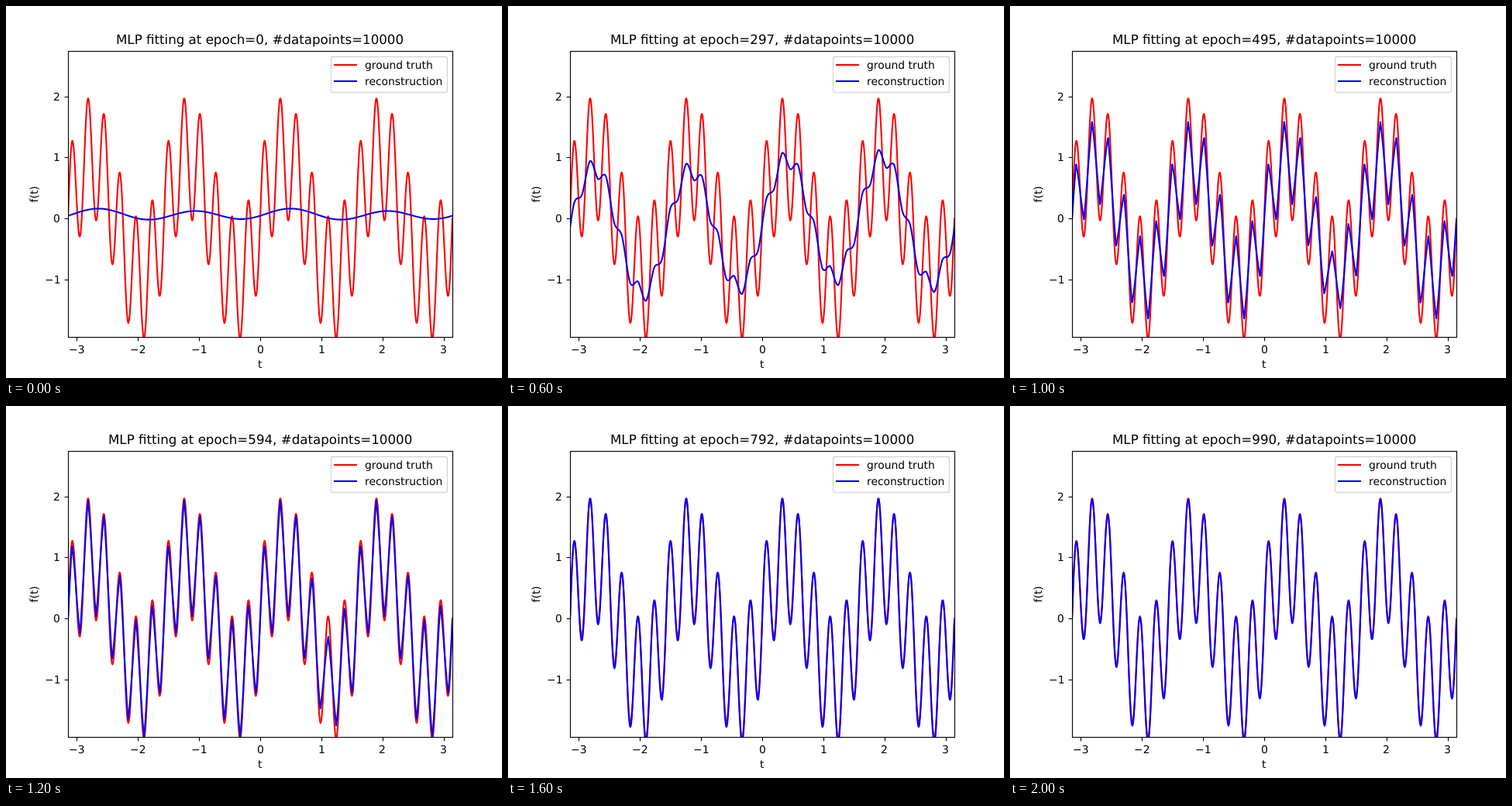
Recreate the animation shown at these times as an HTML page with a canvas. Size 640 by 480 pixels, loop 2200 ms.

```html
<!DOCTYPE html>
<html lang="en">
<head>
<meta charset="utf-8">
<title>MLP fitting</title>
<style>
  html, body { margin: 0; width: 100%; height: 100%; overflow: hidden; background: #fff; }
  canvas { display: block; }
</style>
</head>
<body>
<canvas id="plot" width="640" height="480"></canvas>
<script>
const ctx = document.getElementById('plot').getContext('2d');
const FONT = '"DejaVu Sans", sans-serif';
const BOX = { left: 80, right: 576, top: 57.6, bottom: 427.2 };
const WIDTH = BOX.right - BOX.left;
const UNIT = 78.75, ZERO = 274.05;
const STEP_MS = 200, STEPS = 11, EPOCHS = 99;
const LINE = 2.08, THIN = 1.11;

const xOf = t => BOX.left + (t + Math.PI) / (2 * Math.PI) * WIDTH;
const yOf = v => ZERO - v * UNIT;
const mix = (a, b, u) => a + (b - a) * u;

const truth = t => Math.sin(4 * t) + Math.sin(24 * t);

// How much of each wave the network has learned; steps between are blended.
// low, high: swing of the slow and fast wave; corner: how angular the fast one is;
// drift, swell: slow tilts; dip: weak spot where the fast wave is learned late.
const REST = { low: 1, high: 0, lag: 0, bias: 0, drift: 0, swell: 0, corner: 0, dip: 0 };
const stages = [
  { step: 0, low: 0.078, lag: 0.45, bias: 0.063, swell: 0.02 },
  { step: 1, low: 1.05, high: 0.05, lag: 0.04, bias: -0.05 },
  { step: 3, high: 0.15, lag: 0.03, bias: -0.1, drift: 0.13, corner: 0.3 },
  { step: 5, low: 0.97, high: 0.68, bias: -0.03, corner: 0.8, dip: 0.25 },
  { step: 6, low: 1.02, high: 0.96, lag: 0.02, corner: 0.7, dip: 0.28 },
  { step: 8, high: 1.03, bias: -0.035 },
  { step: 10, high: 1.015, bias: -0.03 }
].map(stage => ({ ...REST, ...stage }));

function learned(step) {
  const next = stages.findIndex(s => s.step >= step);
  const b = stages[next], a = stages[Math.max(0, next - 1)];
  const u = a === b ? 0 : (step - a.step) / (b.step - a.step);
  const state = {};
  for (const key in REST) state[key] = mix(a[key], b[key], u);
  return state;
}

function fit(step) {
  const s = learned(step);
  return t => {
    const wave = Math.sin(24 * t);
    const fast = mix(wave, Math.asin(wave) * 2 / Math.PI, s.corner);
    const swing = s.high - s.dip * Math.exp(-(((t - 1.12) / 0.2) ** 2));
    return s.bias + s.low * Math.sin(4 * t - s.lag) + swing * fast
      + s.drift * Math.sin(t + 0.2) + s.swell * Math.sin(2 * t + 0.8);
  };
}

function trace(f) {
  const path = new Path2D();
  const n = 1000;
  for (let i = 0; i <= n; i++) {
    const t = -Math.PI + 2 * Math.PI * i / n;
    path.lineTo(xOf(t), yOf(f(t)));
  }
  return path;
}

const truthPath = trace(truth);
const fitPaths = Array.from({ length: STEPS }, (_, step) => trace(fit(step)));

// Text starts on a whole pixel; align is the share of its width left of x.
function text(str, x, y, align = 0.5, size = 13.89) {
  ctx.font = `${size}px ${FONT}`;
  ctx.textRendering = 'geometricPrecision';
  ctx.textAlign = 'left';
  ctx.fillStyle = '#000';
  ctx.fillText(str, Math.round(x - ctx.measureText(str).width * align), y);
}

function segment(x1, y1, x2, y2, color, width) {
  ctx.strokeStyle = color;
  ctx.lineWidth = width;
  ctx.beginPath();
  ctx.moveTo(x1, y1);
  ctx.lineTo(x2, y2);
  ctx.stroke();
}

const label = n => n < 0 ? '\u2212' + -n : String(n);
const snap = v => Math.round(v) + 0.5;

function drawAxes() {
  ctx.lineCap = 'butt';
  for (let n = -3; n <= 3; n++) {
    const x = xOf(n);
    segment(snap(x), 427.5, snap(x), 432.4, '#000', THIN);
    text(label(n), x, 448);
  }
  for (let n = -1; n <= 2; n++) {
    const y = yOf(n);
    segment(75.6, snap(y), 80.5, snap(y), '#000', THIN);
    text(label(n), 70.3, Math.round(y) + 5, 1);
  }
  ctx.strokeStyle = '#000';
  ctx.lineWidth = THIN;
  ctx.strokeRect(80.5, 58.5, 496, 369);

  text('t', 328, 467);
  ctx.save();
  ctx.translate(41, 242.4);
  ctx.rotate(-Math.PI / 2);
  text('f(t)', 0, 0);
  ctx.restore();
}

function drawCurve(path, color) {
  ctx.strokeStyle = color;
  ctx.lineWidth = LINE;
  ctx.stroke(path);
}

function drawLegend() {
  ctx.beginPath();
  ctx.roundRect(419.5, 65.5, 150, 46, 2.8);
  ctx.fillStyle = 'rgba(255,255,255,0.8)';
  ctx.fill();
  ctx.strokeStyle = 'rgba(204,204,204,0.8)';
  ctx.lineWidth = 1.39;
  ctx.stroke();
  ctx.lineCap = 'square';
  segment(424, 76, 452, 76, 'red', LINE);
  segment(424, 97, 452, 97, 'blue', LINE);
  text('ground truth', 463, 81, 0);
  text('reconstruction', 463, 102, 0);
}

function draw(step) {
  ctx.fillStyle = '#fff';
  ctx.fillRect(0, 0, 640, 480);

  ctx.save();
  ctx.beginPath();
  ctx.rect(BOX.left, BOX.top, WIDTH, BOX.bottom - BOX.top);
  ctx.clip();
  ctx.lineJoin = 'round';
  drawCurve(truthPath, 'red');
  drawCurve(fitPaths[step], 'blue');
  ctx.restore();

  drawAxes();
  text(`MLP fitting at epoch=${step * EPOCHS}, #datapoints=10000`, 328, 49, 0.5, 16.67);
  drawLegend();
}

const start = performance.now();
function tick() {
  const elapsed = Math.max(0, performance.now() - start);
  draw(Math.floor(elapsed / STEP_MS) % STEPS);
  requestAnimationFrame(tick);
}
tick();
</script>
</body>
</html>
```
